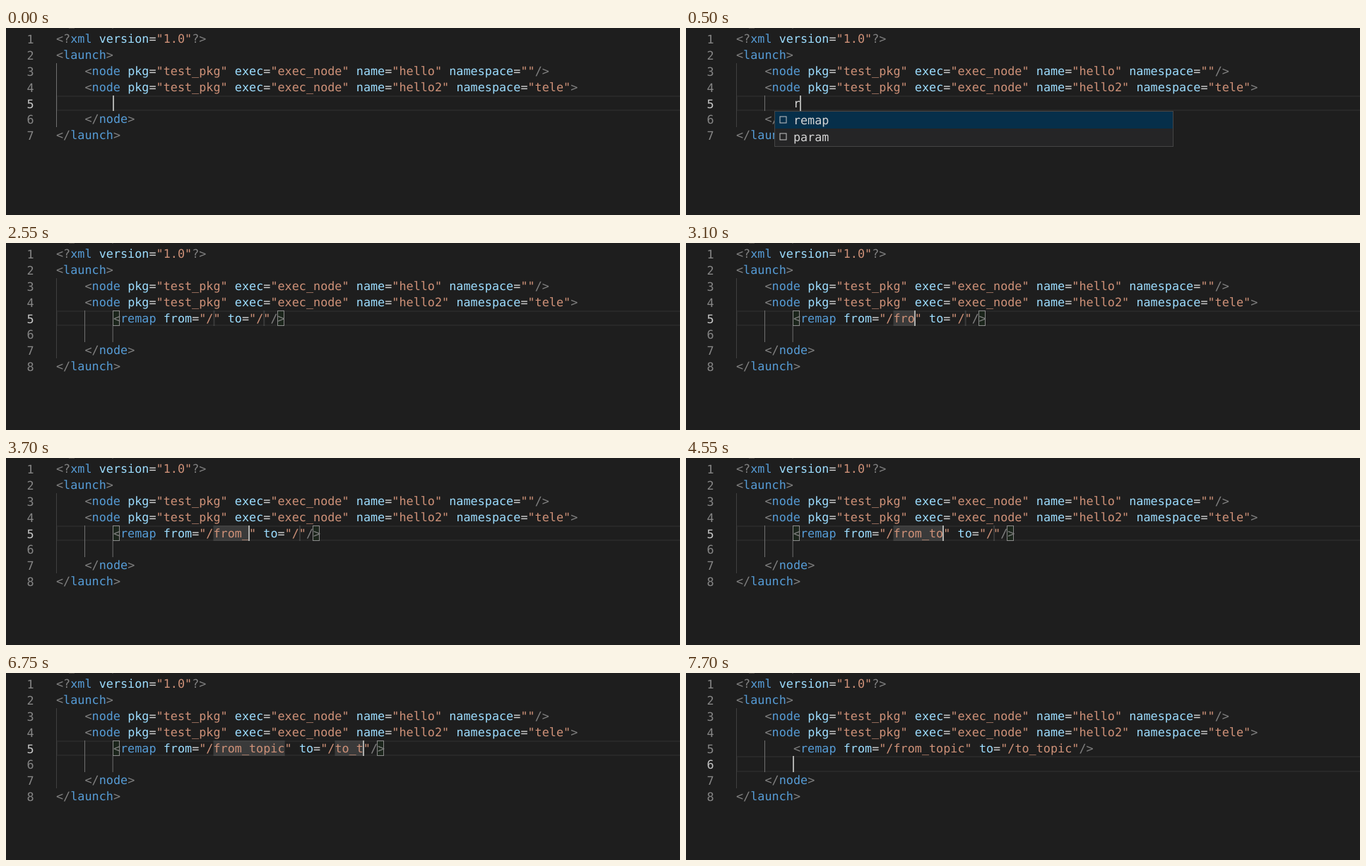
Animation, 954 px wide and 266 px high, one loop 8000 ms. Source, as an HTML page:

```html
<!DOCTYPE html>
<html lang="en">
<head>
<meta charset="utf-8">
<title>Launch file editor</title>
<style>
  html, body { margin: 0; width: 100%; height: 100%; overflow: hidden; background: #1e1e1e; }
  svg { display: block; }
  text {
    font: 16.8px "DejaVu Sans Mono", monospace;
    text-rendering: geometricPrecision;
    white-space: pre;
  }
</style>
</head>
<body>
<svg id="stage" width="954" height="266" viewBox="0 0 954 266"></svg>
<script>
const LOOP = 8000;
const CHAR = 10.114, ROW = 22.8, LEFT = 71;
const COLORS = { punct: '#808080', tag: '#569cd6', attr: '#9cdcfe', string: '#ce9178', plain: '#d4d4d4' };

// Editing script: key times in ms
const OPEN = 450, POPUP = 500, INSERT = 1000, STOPS = 1050, MATCH = 1150;
const NEXT = 5300, DONE = 7650, UNMATCH = 7700;
const FROM = { text: 'from_topic', keys: [2850, 3000, 3100, 3300, 3700, 4300, 4550, 4700, 4850, 5050] };
const TO = { text: 'to_topic', keys: [5950, 6050, 6400, 6750, 6850, 7000, 7200, 7350] };
const EVENTS = [0, OPEN, POPUP, INSERT, STOPS, ...FROM.keys, NEXT, ...TO.keys, DONE];

const stage = document.getElementById('stage');
const colX = col => LEFT + col * CHAR;
const rowY = row => Math.round(4.4 + ROW * row);
const baseline = row => 21 + Math.floor(ROW * row + 0.8);
const typed = (field, t) => field.text.slice(0, field.keys.filter(k => k <= t).length);

const rect = (x, y, w, h, fill, extra = '') =>
  `<rect x="${x}" y="${y}" width="${w}" height="${h}" fill="${fill}" ${extra}/>`;

const escapeText = s => s.replace(/&/g, '&amp;').replace(/</g, '&lt;').replace(/>/g, '&gt;');

const label = (x, y, s, fill) => `<text x="${x}" y="${y}" fill="${fill}">${escapeText(s)}</text>`;

function codeLine(line, row) {
  let out = '', opened = false;
  for (const m of line.matchAll(/<\?|\?>|<\/|\/>|[<>]|"[^"]*"|=|\w+/g)) {
    const s = m[0];
    let kind = 'punct';
    if (s[0] === '"') kind = 'string';
    else if (s === '=') kind = 'plain';
    else if (/\w/.test(s[0])) kind = opened ? 'tag' : line.includes('<') ? 'attr' : 'plain';
    opened = s[0] === '<';
    out += label(colX(m.index), baseline(row), s, COLORS[kind]);
  }
  return out;
}

function guide(col, from, to, active) {
  const y = rowY(from);
  return rect(Math.round(colX(col)), y, 1, rowY(to) - y, active ? '#707070' : '#404040');
}

function bracket(col) {
  return rect(Math.round(colX(col)) - 0.5, rowY(4) + 0.5, 9, 21, 'rgba(0,100,0,.1)', 'stroke="#888"');
}

function tabStop(col, length) {
  return rect(colX(col), rowY(4), Math.max(2, length * CHAR), 22, 'rgba(124,124,124,.3)');
}

function popup() {
  const x = 125, y = 118, w = 565, h = 51;
  const item = (i, name) =>
    rect(x + 8, y + 8 + i * 24, 9, 9, 'none', 'stroke="#c5c5c5"') +
    label(colX(8), y + 19 + i * 24, name, '#d4d4d4');
  return rect(x + 0.5, y + 0.5, w - 1, h - 1, '#252526', 'stroke="#454545"') +
    rect(x + 1, y + 1, w - 2, 24, '#062f4a') + item(0, 'remap') + item(1, 'param');
}

function draw(t) {
  const inserted = t >= INSERT, row = t >= DONE ? 5 : 4;
  const from = typed(FROM, t), to = typed(TO, t);
  const start = 8 + '<remap from="/'.length;
  const second = start + from.length + '" to="/'.length;
  const end = second + to.length + '"/'.length;
  const indent = ' '.repeat(8);

  const lines = [
    '<?xml version="1.0"?>',
    '<launch>',
    '    <node pkg="test_pkg" exec="exec_node" name="hello" namespace=""/>',
    '    <node pkg="test_pkg" exec="exec_node" name="hello2" namespace="tele">',
    ...(inserted ? [`${indent}<remap from="/${from}" to="/${to}"/>`, indent]
                 : [indent + (t >= OPEN ? 'r' : '')]),
    '    </node>',
    '</launch>'
  ];

  // Slivers of the line scrolled off above
  let out = rect(89, 0, 8, 1, '#484440') + rect(150, 0, 2, 1, '#3c3c3c');

  const top = rowY(row), height = rowY(row + 1) - top;
  out += rect(LEFT + 1, top + 1, 960, height - 2, 'none', 'stroke="#282828" stroke-width="2"');

  out += guide(0, 2, inserted ? 7 : 6, t < OPEN);
  if (t >= OPEN) out += guide(4, 4, inserted ? 6 : 5, true);

  if (t >= STOPS && t < DONE) {
    out += tabStop(start, from.length) + tabStop(second, to.length);
    out += rect(150.5, rowY(5), 1.5, 23, '#525252');
  }
  if (t >= MATCH && t < UNMATCH) out += bracket(8) + bracket(end);

  lines.forEach((line, i) => {
    out += codeLine(line, i);
    out += label(29.5, 22 + Math.ceil(ROW * i), String(i + 1), i === row ? '#c6c6c6' : '#858585');
  });

  let caret = 8;
  if (t >= OPEN) caret = 9;
  if (inserted) caret = start + from.length;
  if (t >= NEXT) caret = second + to.length;
  if (t >= DONE) caret = 8;
  const last = EVENTS.filter(e => e <= t).pop();
  if (Math.floor((t - last) / 500) % 2 === 0) {
    out += rect(Math.round(colX(caret)) - 1, top, 2, height, '#aeafad');
  }

  if (t >= POPUP && t < INSERT) out += popup();
  return out;
}

let shown = '';
function tick() {
  const picture = draw(performance.now() % LOOP);
  if (picture !== shown) stage.innerHTML = shown = picture;
  requestAnimationFrame(tick);
}
tick();
</script>
</body>
</html>
```
